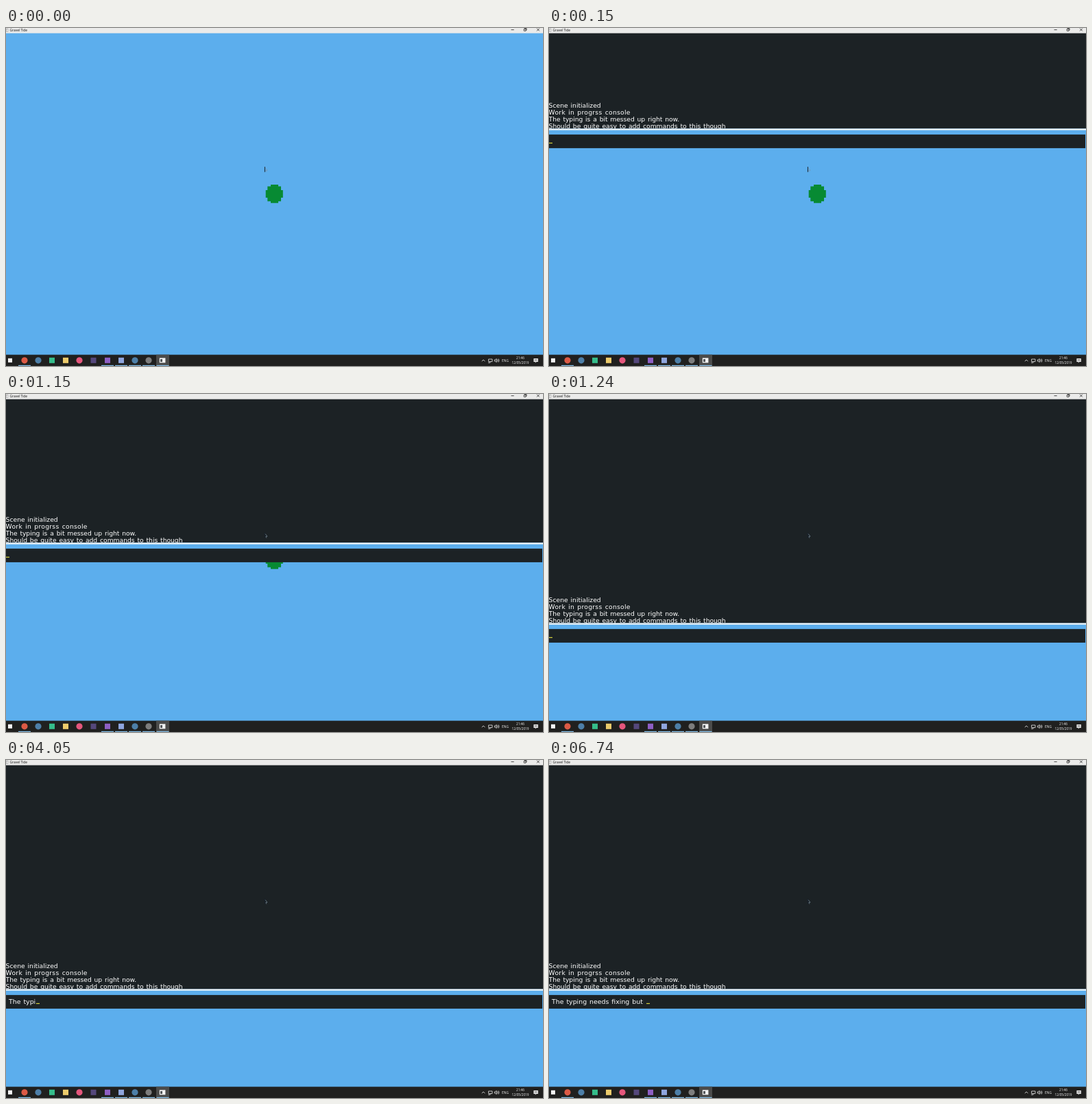
An HTML page that plays this animation: 783x492 px, repeating every 6.85 s.

```html
<!DOCTYPE html>
<html lang="en">
<head>
<meta charset="utf-8">
<title>Console</title>
<style>
html, body { margin: 0; width: 100%; height: 100%; overflow: hidden; background: #5caeed; }
svg { display: block; width: 783px; height: 492px; }
text { white-space: pre; }
.log { font-family: "DejaVu Sans", sans-serif; fill: #fff; word-spacing: 1px; }
.ui { font-family: "Open Sans", sans-serif; }
</style>
</head>
<body>
<svg viewBox="0 0 783 492" xmlns="http://www.w3.org/2000/svg">
  <rect width="783" height="492" fill="#5caeed"/>
  <path id="ball" fill="#078a33" d="M386 228h11v2.5h4v5.5h2.8v11h-2.8v5.3h-4v2.5h-11v-2.5h-4.7v-5.3h-2.6v-11h2.6v-5.5h4.7z"/>

  <g id="panel">
    <rect y="-340" width="783" height="340" fill="#1c2225"/>
    <g id="lines" class="log" font-size="9.2"></g>
    <rect width="783" height="2.2" fill="#f4f8fa"/>
    <rect y="8.6" width="782" height="19.8" fill="#1c2225"/>
    <text id="typed" class="log" x="4" y="21.7" font-size="9.4"></text>
    <rect id="caret" y="20.4" width="5" height="1.2" fill="#d3d03c"/>
  </g>

  <g id="pointer" fill="none">
    <path d="M377.4 202v7.6" stroke="#15202a" stroke-width="1"/>
    <path d="M378 203.6l3 3.6l-2.2 .4l1 2" stroke="#7f93a3" stroke-width=".7"/>
  </g>

  <g id="titlebar">
    <rect width="783" height="7.6" fill="#ebebea"/>
    <rect x=".3" y="1.2" width="2.6" height="3.8" fill="#fff" stroke="#777" stroke-width=".5"/>
    <text class="ui" x="5.5" y="4.9" font-size="4.9" fill="#111">Gravel Tide</text>
    <g fill="none" stroke="#222" stroke-width=".8">
      <path d="M736.5 2.6h4.2M774 .6l3.8 3.8M777.8 .6l-3.8 3.8"/>
      <path d="M755.2 1.4h2.8v2.8h-2.8zM756.2 1.2v-.8h2.8v2.8h-.8"/>
    </g>
  </g>

  <g id="taskbar">
    <rect y="475.6" width="783" height="16.4" fill="#20201f"/>
    <rect x="219" y="475.6" width="19" height="16.4" fill="#4b4b4a"/>
    <g id="apps"></g>
    <rect x="223.8" y="480.3" width="8.6" height="7" fill="#f2f2f2"/>
    <rect x="225" y="482" width="3" height="4" fill="#55595c"/>
    <g fill="none" stroke="#e8e8e8" stroke-width=".8">
      <path d="M693.8 485.2l2.3-2.3l2.3 2.3"/>
      <path d="M703.6 482h5.4v3.6h-5.4zM703 487.2h3v-1.6"/>
      <path d="M712.4 482.9h1.2l1.6-1.4v5l-1.6-1.4h-1.2zM716.6 482.4q1.2 1.6 0 3.2M718 481.5q2 2.5 0 5"/>
    </g>
    <path d="M769.4 481h6.4v5h-2.6l-1.4 1.6v-1.6h-2.4z" fill="#f0f0f0"/>
    <path d="M770.6 482.6h4M770.6 484.2h4" stroke="#333" stroke-width=".6"/>
    <g class="ui" fill="#f2f2f2" font-size="4.7">
      <text x="723" y="485.7" font-size="4.9">ENG</text>
      <text x="750" y="481.8" text-anchor="middle">21:46</text>
      <text x="750" y="489.3" text-anchor="middle">12/05/2019</text>
    </g>
  </g>
</svg>
<script>
const LOOP = 6850;
const NS = "http://www.w3.org/2000/svg";
const $ = id => document.getElementById(id);

function add(parent, tag, attrs) {
  const el = document.createElementNS(NS, tag);
  for (const k in attrs) el.setAttribute(k, attrs[k]);
  return parent.appendChild(el);
}

// text, letter spacing
[
  ["Scene initialized", 0],
  ["Work in progrss console", 0.28],
  ["The typing is a bit messed up right now.", -0.05],
  ["Should be quite easy to add commands to this though", -0.02]
].forEach(([str, gap], i) => {
  add($("lines"), "text", { x: -0.4, y: -30.2 + i * 9.95, "letter-spacing": gap }).textContent = str;
});

// centre x, shape, colour, running
[
  [6, "square", "#f4f4f4", 0],
  [27, "circle", "#dc5a45", 1],
  [47, "circle", "#4d7fa8", 0],
  [67, "square", "#35bd8b", 0],
  [87, "square", "#eccb6c", 0],
  [107, "circle", "#e5567c", 0],
  [127.5, "square", "#55487c", 0],
  [148, "square", "#8e5fc4", 1],
  [168, "square", "#8fa6de", 1],
  [188, "circle", "#4d7fa8", 1],
  [208, "circle", "#7d7d7d", 1],
  [228.5, "", "", 1]
].forEach(([x, shape, fill, running]) => {
  const apps = $("apps"), r = x < 10 ? 3 : 4;
  if (shape === "circle") add(apps, "circle", { cx: x, cy: 483.8, r: 4.6, fill });
  if (shape === "square") add(apps, "rect", { x: x - r, y: 483.8 - r, width: 2 * r, height: 2 * r, fill });
  if (running) add(apps, "rect", { x: x - 9, y: 490.8, width: 18, height: 1.2, fill: "#83bce6" });
});

// time, y of the panel's lower edge
const slide = [
  [0, -40], [50, 17], [100, 82], [150, 146.5],
  [1100, 151.5], [1150, 216.5], [1190, 268.5], [1240, 333.5]
];

// time, caret x; each step after the first IDLE ones adds a letter
const phrase = "The typing needs fixing but ";
const IDLE = 4;
const keys = [
  [0, 0], [1750, 3], [2050, 0], [2910, 3],
  [2960, 12], [3160, 17], [3250, 22], [3350, 26],
  [3550, 31], [3760, 37], [3850, 42], [4050, 44], [4100, 50], [4150, 56], [4200, 60],
  [4400, 66], [4510, 71], [4660, 77], [4820, 84], [4910, 89], [5060, 92],
  [5260, 97], [5350, 100], [5510, 104], [5560, 106], [5650, 111], [5750, 117.5], [5890, 122],
  [6050, 128], [6550, 134], [6650, 138], [6740, 142]
];

const stepAt = (list, t) => list.findLastIndex(step => step[0] <= t);

function draw(t) {
  const y = slide[stepAt(slide, t)][1];
  $("panel").setAttribute("transform", `translate(0 ${y})`);
  const k = stepAt(keys, t);
  $("typed").textContent = phrase.slice(0, Math.max(0, k - IDLE + 1));
  $("caret").setAttribute("x", keys[k][1]);
}

const start = performance.now();
function tick() {
  draw((performance.now() - start) % LOOP);
  requestAnimationFrame(tick);
}
tick();
</script>
</body>
</html>
```
